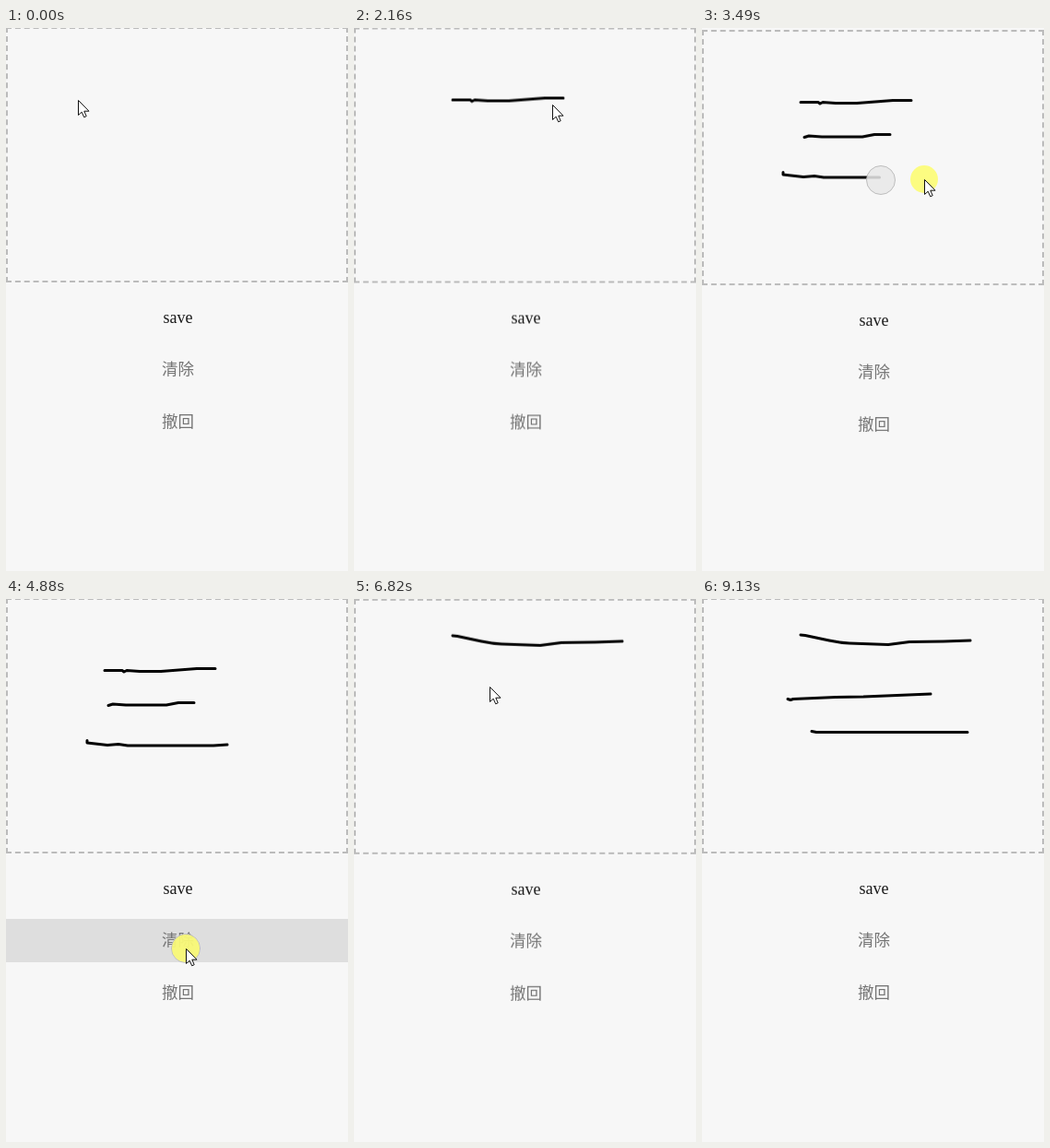
Write an HTML page that moves like this. It is 371 px wide and 589 px high and loops after 9760 ms.

```html
<!DOCTYPE html>
<html lang="zh">
<head>
<meta charset="utf-8">
<style>
  html, body { margin: 0; width: 100%; height: 100%; overflow: hidden; background: #f7f7f7; }
  #page, svg { position: absolute; left: 0; top: 0; width: 371px; height: 589px; }
  #page { will-change: transform; }
  #pad { position: absolute; left: 0; top: -1px; width: 371px; height: 277px;
         box-sizing: border-box; border: 2px dashed #bbb; }
  text { font: 17.5px "Liberation Serif", "Noto Sans CJK SC", "Noto Sans CJK", serif;
         font-weight: 300; text-anchor: middle; fill: #747474; }
  text.latin { font-size: 18px; font-weight: 400; fill: #1a1a1a; }
  #trails path { fill: none; stroke: #000; stroke-width: 3; stroke-linecap: round; stroke-linejoin: round; }
</style>
</head>
<body>
<div id="page">
  <div id="pad"></div>
  <svg viewBox="0 0 371 589">
    <rect id="hover" y="347" width="371" height="47" fill="#dedede"/>
    <text class="latin" x="186.5" y="319.5">save</text>
    <text x="186.5" y="376">清除</text>
    <text x="186.5" y="433">撤回</text>
    <g id="trails"></g>
  </svg>
</div>
<svg viewBox="0 0 371 589">
  <circle id="touch" r="15.5" fill="#e8e8e8" fill-opacity=".86" stroke="#bcbcbc"/>
  <g id="pointer">
    <circle id="glow" r="15" fill="#ffff42" fill-opacity=".65"/>
    <path d="M.5 .5V16.5L4.2 13.2L6.7 18.8L9.2 17.7L6.8 12.2H12Z" fill="#fff" stroke="#111"/>
  </g>
</svg>
<script>
const LOOP = 9760, LAG = 90, CLEAR = 5180;
const PULL = .55, SETTLE = 117; // overscroll strength and decay time
const $ = id => document.getElementById(id);
const clamp = v => Math.min(1, Math.max(0, v));
const smooth = p => p * p * (3 - 2 * p);

// What the hand does: start, end, path, action. Between moves it glides to the next one.
const moves = [
  [0, 70, "M78 78L75 77"],
  [1090, 1550, "M75 77L150 74L108 80"],
  [1700, 2000, "M107 77.5H126L128 79L131 77.5L145 78.5H168L207 75.5H227", "draw"],
  [2430, 2700, "M111 115.5L116 114L130 115H174L187 112.5H204", "draw"],
  [3200, 3490, "M88 153.5V156L110 158.5L122 157.5L132 159H225L240 158", "draw"],
  [4190, 4790, "M195 379h.1"],
  [4880, 4940, "M195 379h.1", "tap"],
  [5030, 5560, "M195 379h.1"],
  [6190, 6500, "M107 39L112 39.5L138 45Q150 47.5 160 48L202 49.5L225 46.5L262 46L291 45", "draw"],
  [6940, 7180, "M93 108.5L96 109.5L99 108.5L145 106.5L175 106L248 103", "draw"],
  [7450, 7720, "M119 143.5L124 144.5H288", "draw"],
  [8430, 9060, "M292 148L350 330L243 558"]
].map(([start, end, d, action]) => {
  const path = document.createElementNS("http://www.w3.org/2000/svg", "path");
  path.setAttribute("d", d);
  $("trails").append(path);
  const box = path.getBBox(), length = path.getTotalLength();
  const drop = box.y + box.height - path.getPointAtLength(0).y;
  return { start, end, release: end + LAG, path, length, drop, action };
});
const strokes = moves.filter(move => move.action === "draw");
const tap = moves.find(move => move.action === "tap");

const progress = (move, t) => clamp((t - move.start) / (move.end - move.start));

function handOn(move, t) {
  const { x, y } = move.path.getPointAtLength(progress(move, t) * move.length);
  return move.action === "draw" ? [x + 1, y + 3] : [x, y];
}

function handAt(t) {
  const index = moves.findLastIndex(move => move.start <= t);
  const move = moves[index], next = moves[index + 1];
  const from = handOn(move, t);
  if (!next || t < move.release) return from;
  const to = handOn(next, next.start);
  const p = smooth(clamp((t - move.release) / (next.start - move.release)));
  return from.map((v, i) => v + (to[i] - v) * p);
}

// A downward drag pulls the page along; it springs back after release.
function overscroll(t) {
  const stroke = strokes.findLast(s => s.start <= t);
  if (!stroke) return 0;
  const pulled = PULL * stroke.drop * clamp(2 * progress(stroke, t - LAG));
  return pulled * Math.exp(-Math.max(0, t - stroke.release) / SETTLE);
}

const place = (el, x, y) => el.setAttribute("transform", `translate(${Math.round(x)} ${Math.round(y)})`);
const show = (el, on) => el.style.display = on ? "" : "none";

function draw(t) {
  for (const move of moves) {
    const { start, path, length, action } = move;
    const p = progress(move, t - LAG);
    show(path, action === "draw" && t >= start + LAG && (t < CLEAR || start > CLEAR));
    path.style.strokeDasharray = p < 1 ? `${p * length} ${length * 2}` : "none";
  }
  const shift = overscroll(t);
  const press = moves.find(m => m.action && t >= m.start && t < m.release);
  show($("glow"), press);
  show($("touch"), press);
  if (press) {
    const [x, y] = handOn(press, t - LAG);
    place($("touch"), x, y + shift);
  }
  const [x, y] = handAt(t);
  place($("pointer"), x, y + shift);
  show($("pointer"), t < 9130);
  show($("hover"), t >= tap.start && t < CLEAR + 80);
  $("page").style.transform = `translateY(${shift}px)`;
}

const began = performance.now();
function frame() {
  draw((performance.now() - began) % LOOP);
  requestAnimationFrame(frame);
}
frame();
</script>
</body>
</html>
```
